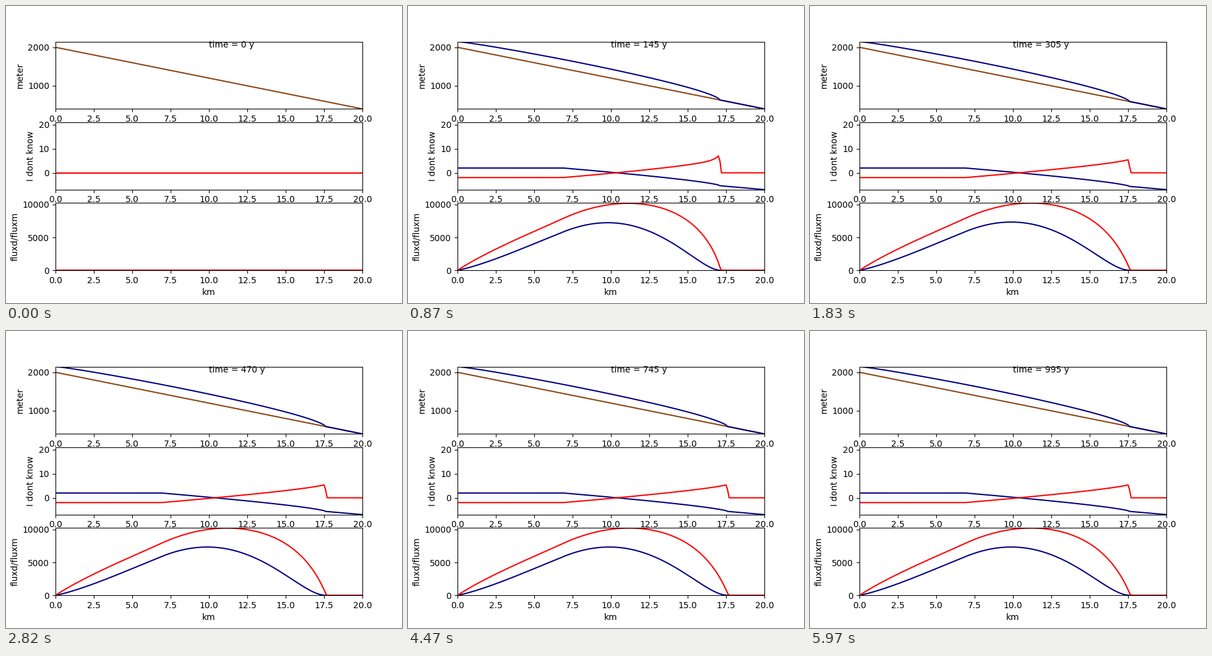
Write a matplotlib script that moves like this. It is 640 px wide and 480 px high and loops after 6 s.

```python
import numpy as np
import matplotlib.pyplot as plt
from matplotlib.animation import FuncAnimation

FRAMES, INTERVAL, YEARS = 200, 30, 5
STEPS = 800            # time steps between two frames
SPIN_UP = 35           # intervals of growth before the first curves show
SETTLED = 85           # the glacier is steady from here on

# valley and climate
dx = 100.0
x = np.arange(0, 20000 + dx, dx)
bed = 2000 - 0.08 * x
ELA, GRADIENT, CAP = 1400.0, 0.007, 2.0

# ice flow: sliding and deformation
SEC = 3600 * 24 * 365.25
RHO_G = 917 * 9.81
SLIDE = 5.7e-20 * SEC * RHO_G**3
DEFORM = 0.4 * 1.9e-24 * SEC * RHO_G**3


def simulate():
    """Return (surface, balance, convergence, deformation, sliding) per frame."""
    n = len(x)
    ice = np.zeros(n)
    flux = np.zeros(n + 1)
    dt = YEARS / STEPS
    zero = np.zeros(n)
    states = []
    for _ in range(SPIN_UP + SETTLED):
        for _ in range(STEPS):
            z = bed + ice
            h = 0.5 * (ice[:-1] + ice[1:])
            drive = h * (z[:-1] - z[1:]) / dx
            cube = drive * drive * drive
            slide = SLIDE * cube
            deform = DEFORM * cube * h * h
            flux[1:-1] = slide + deform
            gain = (flux[:-1] - flux[1:]) / dx
            balance = np.minimum(GRADIENT * (z - ELA), CAP)
            ice = np.maximum(ice + dt * (balance + gain), 0)
        states.append((bed + ice, balance, gain,
                       np.append(0, deform), np.append(0, slide)))
    blank = (np.full(n, np.nan), zero, zero, zero, zero)
    return [blank] + states[SPIN_UP:]


states = simulate()
km = x / 1000
top = max(s[0].max() for s in states[1:])
peak = max(s[4].max() for s in states)

fig, axes = plt.subplots(3, 1, figsize=(6.4, 4.8), dpi=100)
labels = ["meter", "I dont know", "fluxd/fluxm"]
limits = [(bed.min(), top), (-7, 21), (0, peak)]
for ax, label, lim in zip(axes, labels, limits):
    ax.set(xlim=(0, 20), ylim=lim, ylabel=label)
axes[2].set_xlabel("km")

axes[0].plot(km, bed, color="saddlebrown")
curves = [ax.plot(km, np.zeros_like(km), color=color)[0]
          for ax, color in [(axes[0], "navy"),
                            (axes[1], "navy"), (axes[1], "red"),
                            (axes[2], "navy"), (axes[2], "red")]]
clock = axes[0].text(10, 2000, "")


def update(i):
    for curve, data in zip(curves, states[min(i, SETTLED)]):
        curve.set_ydata(data)
    clock.set_text(f"time = {i * YEARS} y")
    return [*curves, clock]


anim = FuncAnimation(fig, update, frames=FRAMES, interval=INTERVAL,
                     repeat=True, repeat_delay=0)
plt.show()
```
